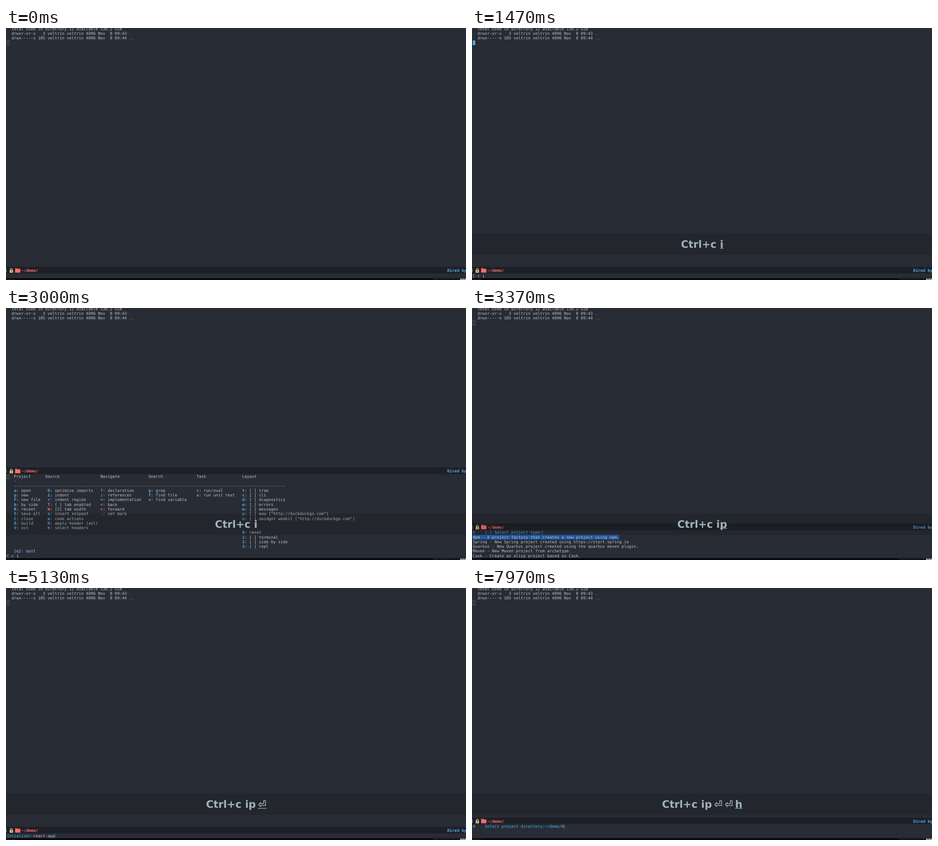
Recreate the animation shown at these times as an HTML page with a canvas. Size 1010 px wide and 555 px high, loop 8 s.

```html
<!DOCTYPE html>
<html lang="en">
<head>
<meta charset="utf-8">
<title>Project menu</title>
<style>
  html, body { margin: 0; width: 100%; height: 100%; overflow: hidden; background: #282c34; }
  canvas { display: block; }
</style>
</head>
<body>
<canvas id="stage" width="1010" height="555"></canvas>
<script>
const ctx = document.getElementById('stage').getContext('2d');
const LOOP = 8000;
const X0 = 1.7, CELL = 5.273, LINE = 10.28, BOTTOM = 550.9;
const SIZE = CELL / 0.60205;
const MONO = '"DejaVu Sans Mono", monospace';
const SANS = '"DejaVu Sans", sans-serif';
const BG = '#282c34', BAR = '#1d2026', FG = '#bbc2cf';
const BLUE = '#51afef', RED = '#ff6c6b', YELLOW = '#ecbe7b', REGION = '#2257a0';

const LISTING = [
  ['  total used in directory 12 available 138.2 GiB', ''],
  ['  drwxr-xr-x   3 veltrin veltrin 4096 Nov  8 09:43 ', '.'],
  ['  drwx-----x 105 veltrin veltrin 4096 Nov  8 09:44 ', '..']
];

// column, heading, heading column, entries as "key label"
const MENU = [
  [3, 'Project', 3, 'o open|p new|F new file|b by side|R recent|S save all|C close|B build|V vcs'],
  [17, 'Source', 16, 'O optimize imports|i indent|r indent region|T [ ] tab enabled|W [2] tab width|s insert snippet|a code actions|H apply header (asl)|h select headers'],
  [39, 'Navigate', 39, '? declaration|/ references|= implementation|< back|> forward|. set mark'],
  [59, 'Search', 59, 'g grep|f find file|v find variable'],
  [79, 'Task', 79, 'r run/eval|u run unit test'],
  [98, 'Layout', 98, 't [ ] tree|c [ ] cli|d [ ] diagnostics|e [ ] errors|m [ ] messages|w [ ] eww ["http://duckduckgo.com"]|x [ ] xwidget webkit ["http://duckduckgo.com"]|||0 reset|1 [ ] terminal|2 [ ] side by side|3 [ ] repl']
];

const TYPES = [
  'Npm - A project factory that creates a new project using npm.',
  'Spring - New Spring project created using https://start.spring.io',
  'Quarkus - New Quarkus project created using the quarkus maven plugin.',
  'Maven - New Maven project from archetype.',
  'Cask - Create an elisp project based on Cask.'
];

// start, keys before the newest one, newest key, end of its underline
const KEYS = [
  [230, 'Ctrl+c', '', 0],
  [1470, 'Ctrl+c ', 'i', 1770],
  [3370, 'Ctrl+c i', 'p', 3630],
  [5130, 'Ctrl+c ip\u2009', '\u23ce', 5400],
  [6900, 'Ctrl+c ip\u2009\u23ce\u2009', '\u23ce', 7200],
  [7970, 'Ctrl+c ip\u2009\u23ce\u2009\u23ce\u2009', 'h', LOOP]
];

const within = (t, a, b) => t >= a && t < b;
const colX = col => X0 + col * CELL;

function rect(x, y, w, h, color) {
  ctx.fillStyle = color;
  ctx.fillRect(x, y, w, h);
}

function write(str, x, y, size, color, font, weight = '') {
  ctx.save();
  ctx.translate(x, y);
  ctx.scale(0.25, 0.25);
  ctx.font = `${weight} ${size * 4}px ${font}`;
  ctx.textRendering = 'geometricPrecision';
  ctx.fillStyle = color;
  ctx.fillText(str, 0, 0);
  const width = ctx.measureText(str).width / 4;
  ctx.restore();
  return width;
}

function put(str, col, top, color = FG, weight = '') {
  write(str, colX(col), top + 8.15, SIZE, color, MONO, weight);
}

function hollow(top) {
  ctx.strokeStyle = '#858a92';
  ctx.lineWidth = 0.6;
  ctx.strokeRect(X0 + 0.3, top + 0.3, CELL - 0.4, LINE - 0.6);
}

const caret = (col, top) => rect(colX(col), top, 0.7, LINE, BLUE);

function lock(y) {
  ctx.strokeStyle = YELLOW;
  ctx.lineWidth = 1.2;
  ctx.beginPath();
  ctx.moveTo(9.6, y + 7.5);
  ctx.lineTo(9.6, y + 5.8);
  ctx.arc(11.7, y + 5.8, 2.1, Math.PI, 0);
  ctx.lineTo(13.8, y + 7.5);
  ctx.stroke();
  rect(8, y + 7, 7.4, 6, YELLOW);
  ctx.fillStyle = BAR;
  ctx.beginPath();
  ctx.arc(11.7, y + 10, 1, 0, 7);
  ctx.fill();
}

function folder(y) {
  rect(20, y + 3, 5.6, 3, RED);
  rect(20, y + 4.4, 11.6, 8.4, RED);
  rect(21, y + 4.4, 4.4, 0.5, BAR);
}

function modeline(bottom) {
  const y = bottom - 14.7;
  rect(0, y, 1010, 14.7, BAR);
  rect(0, y + 4, 1, 8, BLUE);
  lock(y);
  folder(y);
  write('~/demo/', 34, y + 11.2, SIZE, RED, MONO, 'bold');
  write('Dired by name', 968.8, y + 11.2, SIZE, BLUE, MONO, 'bold');
}

function menu(row) {
  hollow(row(0));
  for (const [col, title, titleCol, items] of MENU) {
    put(title, titleCol, row(0));
    items.split('|').forEach((item, i) => {
      if (!item) return;
      const red = 'TW<>.'.includes(item[0]) || item === 'h select headers';
      put(item[0], col, row(3 + i), red ? RED : BLUE, 'bold');
      put(':' + item.slice(1), col + 1, row(3 + i));
    });
  }
  put('-', 3, row(1));
  put('-'.repeat(113), 3, row(2));
  put('[ ]: quit', 3, row(16));
  put('q', 4, row(16), BLUE, 'bold');
  put('C-c i', 0, row(17));
}

function choices(row, list) {
  rect(X0, row(1), list[0].length * CELL, LINE, REGION);
  list.forEach((str, i) => put(str, 0, row(1 + i)));
}

function prompt(row, label, input, caretOn) {
  put(label, 0, row(0), BLUE);
  put(input, label.length, row(0));
  if (caretOn) caret(label.length + input.length, row(0));
}

function minibuffer(t) {
  const rows = within(t, 1530, 3370) ? 18 : within(t, 3370, 5130) ? 6 : t >= 7070 ? 3 : 1;
  const top = BOTTOM - rows * LINE;
  const row = i => top + i * LINE;
  rect(0, top, 1010, BOTTOM - top, BG);
  modeline(top);
  if (within(t, 1170, 1470)) put('C-c-', 0, top);
  else if (within(t, 1470, 1530)) put('C-c i', 0, top);
  else if (rows === 18) menu(row);
  else if (rows === 6) {
    prompt(row, '5    [-] Select project type:', '', t < 3870 || within(t, 4330, 4870));
    choices(row, TYPES);
  } else if (within(t, 5130, 6900)) {
    prompt(row, 'Intializer:', 'react-app', t < 5670 || within(t, 6200, 6600));
  } else if (rows === 3) {
    const typed = t >= 7970;
    prompt(row, (typed ? 0 : 2) + '    Select project directory:~/demo/', typed ? 'h' : '', t < 7470 || typed);
    if (!typed) choices(row, ['./', '../']);
  }
}

function buffer(t) {
  LISTING.forEach(([str, name], i) => {
    const top = -3.35 + i * LINE;
    put(str, 0, top);
    put(name, str.length, top, RED);
  });
  const top = -3.35 + 3 * LINE;
  if (!within(t, 230, 3370)) hollow(top);
  else if (t < 670 || within(t, 1170, 2030) || within(t, 2530, 3000)) rect(X0, top, CELL, LINE, BLUE);
}

function statusBar() {
  rect(0, BOTTOM, 1010, 5, '#07080a');
  write('(7) 1: gp', 2, 554.5, 4, '#5a5d62', SANS);
  write('Monday 08 November 2021 09:47', 937.5, 554.4, 3.6, '#4c4f54', SANS);
  ctx.fillStyle = '#d5d8dc';
  for (const x of [999, 1003.6, 1008]) {
    ctx.beginPath();
    ctx.arc(x, 553.2, 1.8, 0, 7);
    ctx.fill();
  }
}

function keyOverlay(t) {
  const entry = KEYS.filter(k => t >= k[0]).pop();
  if (!entry) return;
  const [, before, last, lineEnd] = entry;
  const size = 22.4, base = 484.2, color = '#a0b3bd';
  ctx.save();
  ctx.globalAlpha = t < 370 ? 0.2 : t < 470 ? 0.6 : t < 530 ? 0.93 : 1;
  rect(0, 452.3, 1010, 47.7, 'rgba(8, 16, 12, 0.15)');
  ctx.font = `bold ${size * 4}px ${SANS}`;
  const total = ctx.measureText(before + last).width / 4;
  const x = 505.5 - total / 2;
  write(before + last, x, base, size, color, SANS, 'bold');
  if (t < lineEnd) {
    const w = ctx.measureText(last).width / 4;
    rect(x + total - w, base + 0.6, w, 1.2, color);
  }
  ctx.restore();
}

function draw(t) {
  rect(0, 0, 1010, 555, BG);
  buffer(t);
  minibuffer(t);
  statusBar();
  keyOverlay(t);
}

const start = performance.now();
function tick() {
  draw((performance.now() - start) % LOOP);
  requestAnimationFrame(tick);
}
tick();
</script>
</body>
</html>
```
